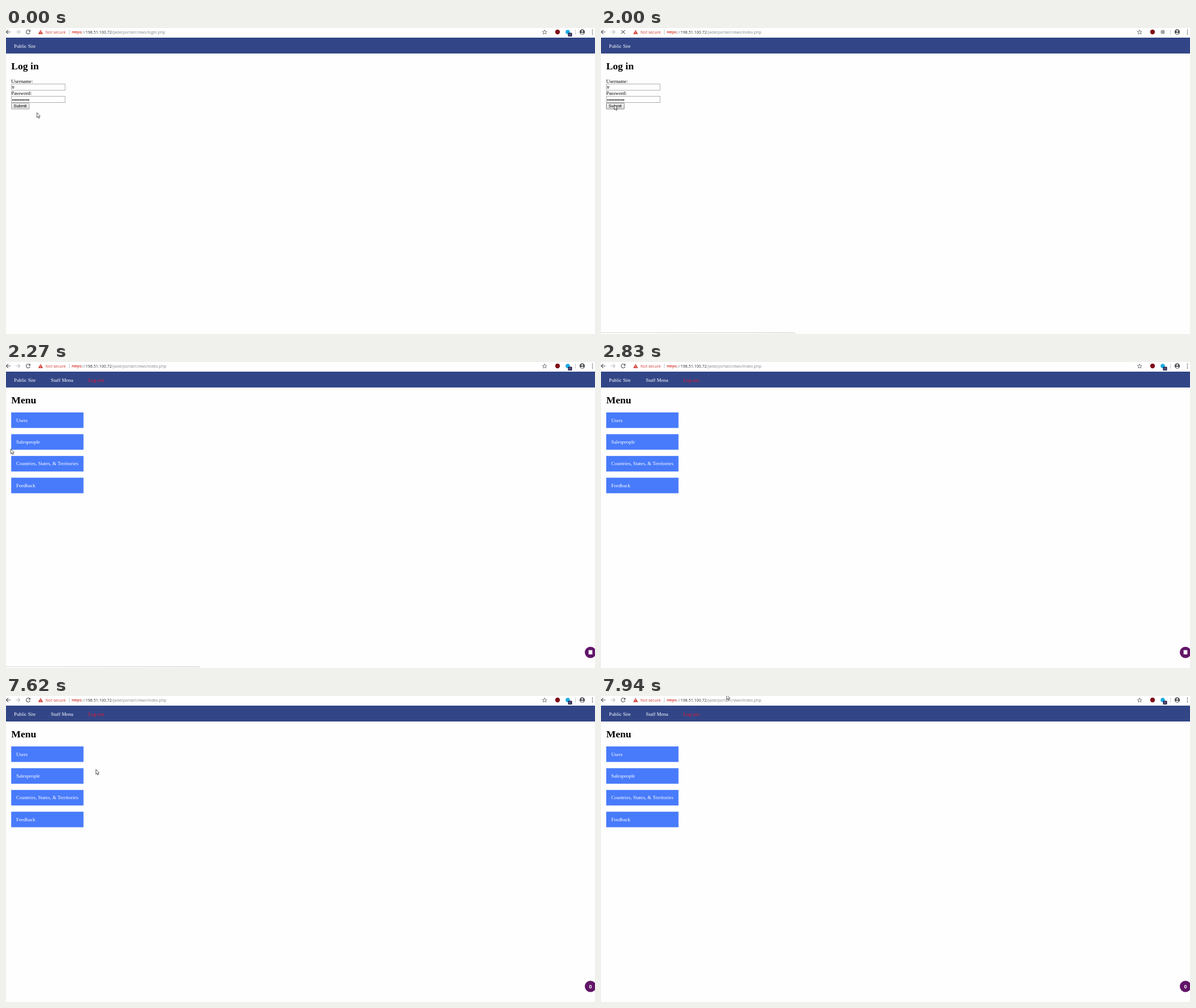
An HTML page for the animation above (8000 ms loop, 1038 by 540 pixels).

```html
<!DOCTYPE html>
<html lang="en">
<head>
<meta charset="utf-8">
<title>Log in</title>
<style>
html, body { margin: 0; width: 100%; height: 100%; overflow: hidden; background: #fefefe; }
svg { display: block; width: 1038px; height: 540px; }
.serif { font: 8.8px "Liberation Serif", "Times New Roman", serif; }
.serif .h1 { font-size: 17.6px; font-weight: bold; }
.sans { font: 7.33px "Liberation Sans", Arial, sans-serif; }
.bar { font: 7.1px "Open Sans", "Noto Sans", sans-serif; }
.icon { fill: none; stroke: #55585c; stroke-width: 1.15; }
.field { fill: #fff; stroke: #adadad; }
</style>
</head>
<body>
<svg viewBox="0 0 1038 540">
  <defs>
    <linearGradient id="face" x2="0" y2="1">
      <stop stop-color="#f3f3f3"/><stop offset="1" stop-color="#dcdcdc"/>
    </linearGradient>
  </defs>

  <!-- Browser toolbar -->
  <rect width="1038" height="17" fill="#fff"/>
  <g class="icon">
    <path d="M8 7H.6M4 3.3L.4 7L4 10.7"/>
    <path d="M17 7h7.4M21 3.3L24.7 7L21 10.7" stroke="#bcbec0"/>
    <g id="reload">
      <path d="M42 5A3.5 3.5 0 1 0 42.4 8.2"/>
      <path d="M43 2.8V6.4H39.4Z" fill="#55585c" stroke="none"/>
    </g>
    <path id="stop" d="M35.8 3.8l6.4 6.4m0-6.4l-6.4 6.4"/>
    <path d="M949.2 3.4l1.1 2.6 2.8.2-2.1 1.8.7 2.8-2.5-1.5-2.5 1.5.7-2.8-2.1-1.8 2.8-.2Z" stroke-width=".8"/>
    <path d="M111.5 3v8.5M1003.5 3v8.5" stroke="#c6c8ca" stroke-width="1"/>
  </g>
  <path d="M61 3.2L65.2 10.7H56.8Z" fill="#d23a31"/>
  <path d="M61 5.6v2.4m0 .8v1" stroke="#fff" stroke-width=".9"/>
  <g class="bar">
    <text x="69.5" y="9.8" fill="#d23a31">Not secure</text>
    <text x="116" y="9.8" fill="#80848a"><tspan fill="#d23a31" text-decoration="line-through">https</tspan>://<tspan fill="#303338">198.51.100.72</tspan>/jade/portal/crews/<tspan id="page"></tspan>.php</text>
  </g>
  <circle cx="972" cy="7" r="4.2" fill="#800f18"/>
  <circle id="addon" cx="990" cy="7" r="3.8"/>
  <g id="badge">
    <rect x="990.5" y="8.5" width="7" height="6.5" rx="1" fill="#1d1746"/>
    <text class="sans" x="994" y="14" text-anchor="middle" fill="#fff" style="font-size:6px">0</text>
  </g>
  <circle cx="1015.5" cy="7" r="4.7" fill="#505357"/>
  <circle cx="1015.5" cy="5.3" r="1.5" fill="#fff"/>
  <path d="M1012.6 9.5q2.9-2.6 5.8 0q-2.9 2.6-5.8 0" fill="#fff"/>
  <path d="M1033.5 3.7v7" stroke="#505357" stroke-width="1.8" stroke-linecap="round" stroke-dasharray="0 3.4"/>

  <rect y="17" width="1038" height="28" fill="#324687"/>
  <text class="serif" x="14" y="34.8" fill="#fff">Public Site</text>

  <g id="login" class="serif">
    <text class="h1" x="9.3" y="72.7">Log in</text>
    <text x="9.3" y="96.8">Username:</text>
    <rect class="field" x="9.5" y="98.9" width="94.6" height="11"/>
    <text x="9.3" y="118.2">Password:</text>
    <rect class="field" x="9.5" y="120.5" width="94.6" height="11"/>
    <rect id="button" x="9.5" y="132.5" width="31.5" height="10.5" rx=".8"/>
    <g class="sans">
      <text x="10.6" y="107.1">tr</text>
      <text x="10.6" y="128.6">••••••••••••</text>
      <text x="13.6" y="140.2">Submit</text>
    </g>
  </g>

  <g id="menu" class="serif">
    <text x="79" y="34.8" fill="#fff">Staff Menu</text>
    <text x="145" y="34.8" fill="#f0142c">Log out</text>
    <text class="h1" x="9.3" y="72.7">Menu</text>
    <g id="links"></g>
    <circle cx="1030" cy="512.5" r="10" fill="#621568"/>
    <rect id="mark" x="1026.7" y="508.5" width="6.6" height="7.5" fill="#fff"/>
    <text id="count" class="sans" x="1030" y="515.6" text-anchor="middle" fill="#fff" style="font-size:9px;font-weight:bold">0</text>
  </g>

  <path id="status" d="M0 537.5H340.5Q342 537.5 342 540" fill="#f4f4f4" stroke="#d6d6d6"/>
  <path id="cursor" d="M.5.5V9.1L2.4 7.4L3.7 10.3L5 9.7L3.8 6.9H6.3Z" fill="#fff" stroke="#222" stroke-width=".75"/>
</svg>

<script>
const LOOP = 8000;
const el = id => document.getElementById(id);
const show = (id, on) => el(id).style.display = on ? '' : 'none';

// Pointer positions: start time, x, y; no position means out of the window
const moves = [
  [0, 54, 149], [280, 50, 144], [410, 39, 154], [560, 21, 136],
  [720, 22, 135], [880, 23, 135], [2270, 8, 153], [2400],
  [7620, 158, 129], [7780], [7940, 221, -3]
];

el('links').innerHTML = ['Users', 'Salespeople', 'Countries, States, &amp; Territories', 'Feedback']
  .map((label, i) => {
    const y = 89 + i * 38.4;
    return `<rect x="9.2" y="${y}" width="127.4" height="27.4" fill="#487bfb"/>
      <text x="18" y="${y + 16.5}" fill="#fff">${label}</text>`;
  }).join('');

function draw(now) {
  const t = now % LOOP;
  const within = (from, to) => t >= from && t < to;
  const loading = within(1580, 2130);
  const waiting = within(2000, 2130);
  const pressed = within(1420, 1580);

  show('login', t < 2130);
  show('menu', t >= 2130);
  show('reload', !loading);
  show('stop', loading);
  show('status', within(1730, 2830));
  show('badge', !waiting);
  show('mark', t < 4090);
  show('count', t >= 4090);
  el('addon').setAttribute('fill', waiting ? '#a3a5a8' : '#18ace4');
  el('page').textContent = t < 2000 ? 'login' : 'index';
  el('button').setAttribute('fill', pressed ? '#d2d2d2' : 'url(#face)');
  el('button').setAttribute('stroke', t < 560 ? '#a6a6a6' : '#858585');

  const [, x, y] = moves.findLast(m => m[0] <= t);
  show('cursor', x !== undefined);
  if (x !== undefined) el('cursor').setAttribute('transform', `translate(${x} ${y})`);
}

const start = performance.now();
function tick() {
  draw(performance.now() - start);
  requestAnimationFrame(tick);
}
tick();
</script>
</body>
</html>
```
